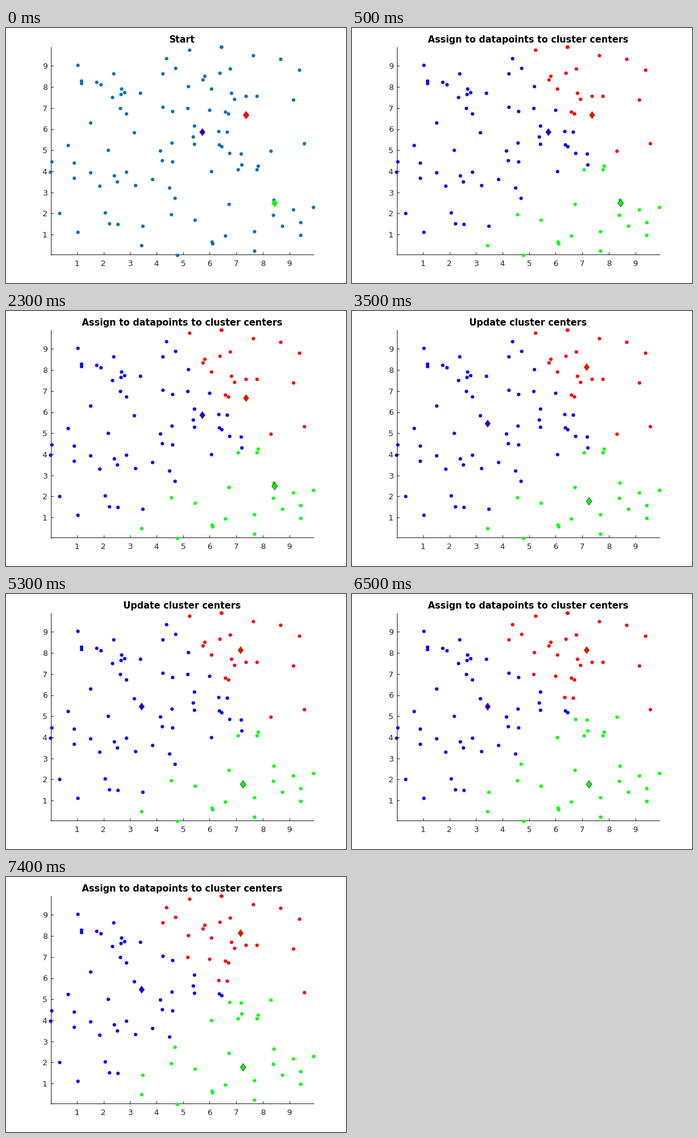
Recreate the animation shown at these times as a matplotlib script. Size 560x420 px, loop 8 s.

```python
import matplotlib.pyplot as plt
import numpy as np
from matplotlib.animation import FuncAnimation
from matplotlib.patches import Polygon

W, H, DPI = 560, 420, 100
STEP_MS, STEPS = 500, 16
PX = 72 / DPI                       # points per pixel
UNIT = np.array([43.72, 34.7])      # pixels per data unit
INK = "#262626"
PLAIN = "#0072bd"
FILLS = np.array(["#0000ff", "#ff0000", "#00ff00"])
START_EDGES = ["#d95319", "#a2142f", "#00ff00"]
EDGES = ["#d95319", "#77ac30", "#4b2a5a"]

# Points in stage pixels, listed by region.
LEFT = [
    (118, 61), (124, 87), (124, 91), (149, 89), (156, 93), (177, 75),
    (190, 100), (195, 106), (189, 109), (175, 114), (221, 107), (264, 50),
    (258, 75), (279, 66), (300, 96), (188, 132), (198, 141), (139, 156),
    (211, 172), (102, 193), (168, 201), (112, 222), (75, 220), (73, 237),
    (139, 238), (112, 247), (154, 260), (178, 243), (198, 237), (183, 253),
    (213, 259), (241, 249), (258, 130), (274, 137), (299, 132), (310, 161),
    (308, 179), (310, 191), (273, 189), (254, 202), (257, 218), (274, 220),
    (269, 263), (278, 280), (335, 135), (350, 170), (364, 171), (351, 192),
    (355, 195), (368, 206), (387, 207), (388, 225), (338, 236), (88, 305),
    (163, 304), (118, 336), (170, 322), (184, 323), (225, 326),
]
UPPER = [
    (302, 36), (354, 31), (355, 31), (407, 45), (452, 51), (483, 69),
    (369, 67), (352, 74), (327, 79), (324, 85), (338, 100), (371, 107),
    (376, 117), (395, 112), (413, 112), (473, 118), (361, 138), (366, 141),
    (436, 202.4), (491, 190),
]
LOWER = [
    (382, 233), (413, 233), (415, 227), (441, 283), (506, 295), (473, 299),
    (440, 308), (485, 320), (455, 326), (485, 341), (409, 335), (409, 367),
    (367, 290), (311, 316), (272, 307), (361, 342), (339, 352), (340, 355),
    (223, 358), (282, 374),
]
POINTS = np.array(LEFT + UPPER + LOWER, float)
FIRST = np.array([(323, 171), (395, 143), (442, 288)], float)
SECOND = np.array([(223, 185), (386, 92), (390, 313)], float)
DIAMOND = np.array([(0, -6.2), (4.7, 0), (0, 6.2), (-4.7, 0)])


def nearest(centers):
    gaps = (POINTS[:, None] - centers[None]) / UNIT
    return (gaps ** 2).sum(axis=2).argmin(axis=1)


ASSIGN = "Assign to datapoints to cluster centers"
# start step, title, shown centers, dot colours, marker edges
STAGES = [
    (0, "Start", FIRST, [PLAIN] * len(POINTS), START_EDGES),
    (1, ASSIGN, FIRST, FILLS[nearest(FIRST)], EDGES),
    (7, "Update cluster centers", SECOND, FILLS[nearest(FIRST)], EDGES),
    (13, ASSIGN, SECOND, FILLS[nearest(SECOND)], EDGES),
]

fig = plt.figure(figsize=(W / DPI, H / DPI), dpi=DPI, facecolor="white")
ax = fig.add_axes([0, 0, 1, 1])
ax.set_xlim(-0.5, W - 0.5)
ax.set_ylim(H - 0.5, -0.5)
ax.axis("off")


def line(xs, ys):
    ax.plot(xs, ys, color=INK, lw=PX, solid_capstyle="butt", zorder=1)


def label(x, y, text, ha):
    ax.text(x, y, text, ha=ha, va="baseline", color=INK,
            family="DejaVu Sans", size=13 * PX)


line([73, 73], [31, 373.5])
line([72.5, 506], [373, 373])
for n in range(1, 10):
    x = 116.3 + UNIT[0] * (n - 1)
    y = 339.6 - UNIT[1] * (n - 1)
    line([x, x], [373, 369])
    line([73, 77], [y, y])
    label(x, 392, str(n), "center")
    label(67.5, y + 4.8, str(n), "right")

title = ax.text(289.8, 24, "", ha="center", va="baseline", color="black",
                family="DejaVu Sans", weight="bold", size=15 * PX)
dots = ax.scatter(*POINTS.T, s=(5.8 * PX) ** 2, linewidths=0, zorder=2)
markers = [ax.add_patch(Polygon(DIAMOND, facecolor=c, lw=0.8 * PX, zorder=3))
           for c in FILLS]


def draw(step):
    _, text, centers, colors, edges = [s for s in STAGES if s[0] <= step][-1]
    title.set_text(text)
    dots.set_facecolors(list(colors))
    for marker, center, edge in zip(markers, centers, edges):
        marker.set_xy(center + DIAMOND)
        marker.set_edgecolor(edge)
    return [title, dots, *markers]


anim = FuncAnimation(fig, draw, frames=STEPS, interval=STEP_MS,
                     repeat=True, repeat_delay=0)
plt.show()
```
